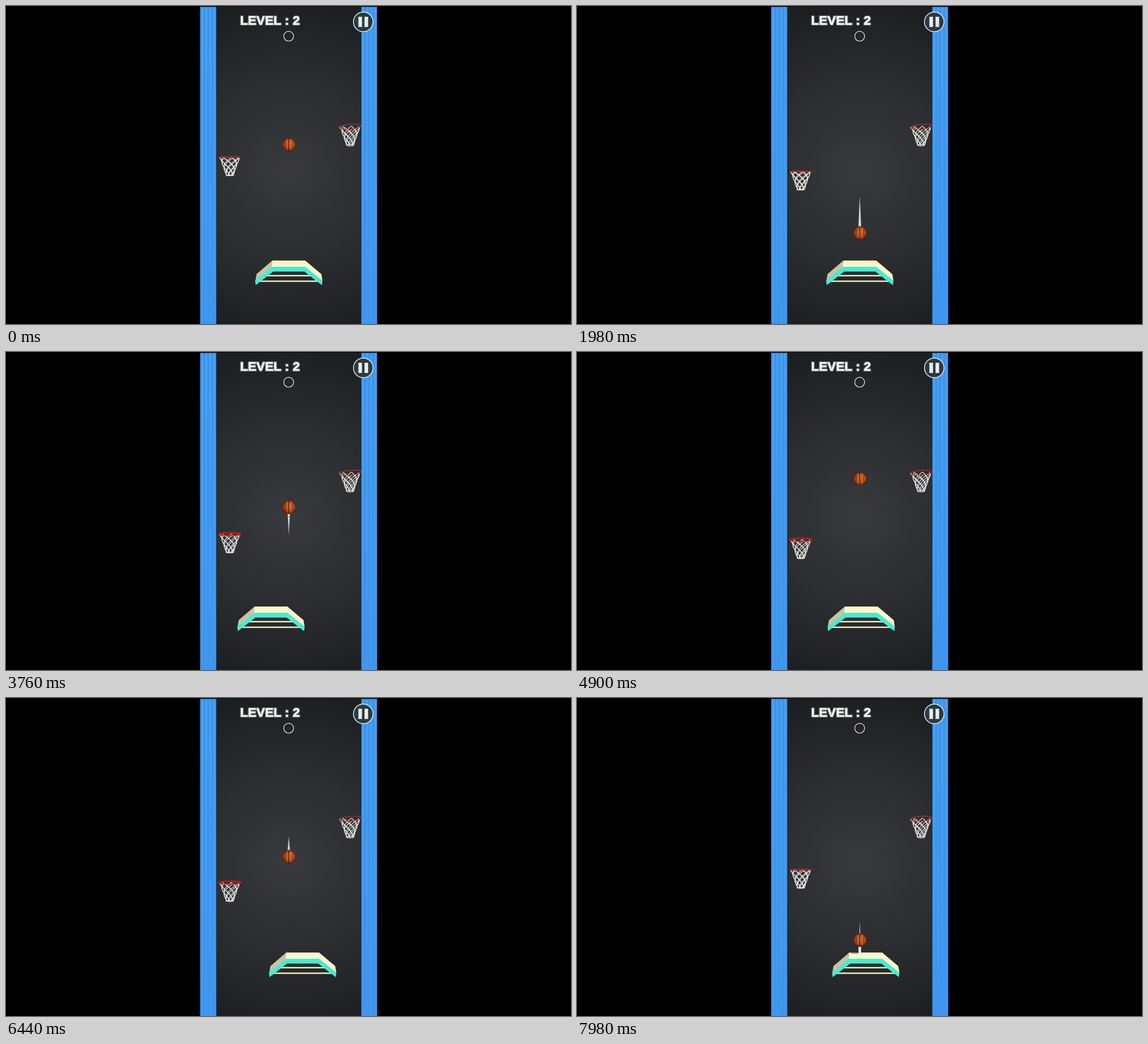
Animation of 998x561 px, one loop 8 s. Source, as an HTML page with a canvas:

```html
<!DOCTYPE html>
<html lang="en">
<head>
<meta charset="utf-8">
<title>Bouncing basketball</title>
<style>
html, body { margin: 0; width: 100%; height: 100%; overflow: hidden; background: #000; }
canvas { display: block; }
</style>
</head>
<body>
<canvas id="stage" width="998" height="561"></canvas>
<script>
const ctx = document.getElementById('stage').getContext('2d');
const LOOP = 8000;
const TRAIL = 530;
const BALL_X = 500;

// The playback advances in uneven beats: 20, 20, then a 100 ms hold.
function heldTime(t) {
  if (t < 120) return t < 20 ? 0 : 20;
  const beat = (start, from) => {
    const base = start + Math.floor((from - start) / 140) * 140;
    return base + Math.min(40, Math.floor((from - base) / 20) * 20);
  };
  if (t < 4880) return beat(120, t);
  if (t < 5040) return Math.min(4940, Math.floor(t / 20) * 20);
  return beat(5040, t);
}

// Successive flights, each one a parabola: [apex time, apex y].
const flights = [[-322, 241.5], [5060, 223], [10588, 223]];
const ballY = t => Math.min(...flights.map(([apex, y]) => y + 3e-5 * (t - apex) ** 2));
const hoopY = t => 298.5 + 33.5 * Math.cos(5.37e-4 * (t - 5290));

const paddleKeys = [[0, 499.5], [2680, 499.5], [3760, 468], [4900, 502], [6440, 524], [8000, 510]];
function paddleX(t) {
  const i = paddleKeys.findIndex(([time]) => time > t);
  const [t0, x0] = paddleKeys[i - 1], [t1, x1] = paddleKeys[i];
  const p = (t - t0) / (t1 - t0);
  return x0 + (x1 - x0) * p * p * (3 - 2 * p);
}

function polygon(color, points) {
  ctx.fillStyle = color;
  ctx.beginPath();
  points.forEach(([x, y]) => ctx.lineTo(x, y));
  ctx.fill();
}

function disc(x, y, r, fill, stroke, width) {
  ctx.beginPath();
  ctx.arc(x, y, r, 0, Math.PI * 2);
  if (fill) { ctx.fillStyle = fill; ctx.fill(); }
  if (stroke) { ctx.strokeStyle = stroke; ctx.lineWidth = width; ctx.stroke(); }
}

function pillar(x, width) {
  const g = ctx.createLinearGradient(x, 0, x + width, 0);
  for (let i = 0; i <= 8; i++) g.addColorStop(i / 8, i % 2 ? '#4ca5f4' : '#3b8fe6');
  ctx.fillStyle = g;
  ctx.fillRect(x, 1.5, width, 560);
  const shade = ctx.createLinearGradient(0, 0, 0, 561);
  shade.addColorStop(0, 'rgba(63,148,236,0)');
  shade.addColorStop(1, 'rgba(63,148,236,.75)');
  ctx.fillStyle = shade;
  ctx.fillRect(x, 1.5, width, 560);
}

function drawCourt() {
  ctx.fillStyle = '#000';
  ctx.fillRect(0, 0, 998, 561);
  const g = ctx.createRadialGradient(499, 290, 10, 499, 290, 300);
  g.addColorStop(0, '#38393c');
  g.addColorStop(.5, '#2c2d30');
  g.addColorStop(1, '#1c1f21');
  ctx.fillStyle = g;
  ctx.fillRect(371, 1, 257, 560);
  pillar(343, 28.5);
  pillar(627.5, 28);
  ctx.fillStyle = '#16293c';
  ctx.fillRect(371.5, 1, 1, 560);
  ctx.fillRect(626.5, 1, 1, 560);
}

function drawHud() {
  ctx.font = 'bold 22.6px "Liberation Sans", Arial, sans-serif';
  ctx.lineJoin = 'round';
  ctx.lineWidth = 2.6;
  ctx.strokeStyle = '#8a8b8c';
  ctx.strokeText('LEVEL : 2', 413.5, 33);
  ctx.fillStyle = '#fff';
  ctx.fillText('LEVEL : 2', 413.5, 33);
  disc(499.3, 53.3, 8.7, null, '#eee', 1.2);
  disc(631, 28, 17.3, '#293c42', '#e4e8e8', 1.5);
  ctx.fillStyle = '#eceeee';
  ctx.fillRect(622.5, 19, 6.3, 18);
  ctx.fillRect(633.3, 19, 6.3, 18);
}

function drawHoop(x, y, tilt) {
  const ry = Math.max(.5, Math.abs(y - 284) * .062);
  const fromAbove = y > 303;
  const rim = (start, end) => {
    ctx.strokeStyle = fromAbove ? '#d81c1c' : '#b3322b';
    ctx.lineWidth = fromAbove ? 1.8 : 1.3;
    ctx.beginPath();
    ctx.ellipse(x, y, 19.7, ry, tilt, start, end);
    ctx.stroke();
  };
  rim(Math.PI, Math.PI * 2);
  ctx.strokeStyle = '#e2e2de';
  ctx.lineWidth = 1.2;
  for (const dir of [-1, 1]) {
    for (let k = 0; k < 7; k++) {
      ctx.beginPath();
      for (let v = 0; v <= 1.001; v += .1) {
        const angle = k * Math.PI / 3.5 + .3 + dir * v * 2.5;
        const half = 18 - 11.7 * v ** .9;
        ctx.lineTo(x + half * Math.sin(angle), y + 1 + v * 31.5 + ry * .5 * (1 - v * .5) * Math.cos(angle));
      }
      ctx.stroke();
    }
  }
  ctx.beginPath();
  ctx.ellipse(x, y + 32.5, 6.3, Math.max(.5, ry * .3), 0, 0, Math.PI * 2);
  ctx.stroke();
  rim(0, Math.PI);
}

function drawPaddle(x, y) {
  ctx.save();
  ctx.translate(x, 0);
  ctx.fillStyle = '#f3edbd';
  ctx.fillRect(-40, 474.5, 80, 2.5);
  ctx.fillRect(-51, 484.3, 102, 2.5);
  polygon('#c9c3a0', [[-29, 449], [-57, 473], [-59, 485], [-29, 461]]);
  polygon('#fdf7c6', [[29, 449], [57.5, 473], [59.5, 485], [29, 461]]);
  polygon('#fff7c8', [[-29, 449], [29, 449], [30, 460.5], [-30, 460.5]]);
  polygon('#45ebd3', [[-29, 460], [29, 460], [59.5, 484.5], [58.5, 492.5],
    [27.5, 468.5], [-27.5, 468.5], [-58.5, 492.5], [-59.5, 484.5]]);
  ctx.restore();
  if (y > 405) {
    ctx.fillStyle = 'rgba(90,88,75,.6)';
    ctx.beginPath();
    ctx.ellipse(491, 450, 8, 1.3, 0, 0, Math.PI * 2);
    ctx.fill();
  }
}

function drawTrail(t) {
  const steps = 40;
  ctx.strokeStyle = '#e8e8ec';
  for (let i = steps; i > 0; i--) {
    ctx.lineWidth = 5.6 * (1 - (i - .5) / steps);
    ctx.beginPath();
    ctx.moveTo(499.5, ballY(t - TRAIL * i / steps));
    ctx.lineTo(499.5, ballY(t - TRAIL * (i - 1) / steps));
    ctx.stroke();
  }
}

function drawBall(y) {
  ctx.save();
  ctx.translate(BALL_X, y);
  const g = ctx.createRadialGradient(2, -3, 1, 0, 0, 12);
  g.addColorStop(0, '#d9662f');
  g.addColorStop(.65, '#b95022');
  g.addColorStop(1, '#4a1f10');
  disc(0, 0, 12, g);
  ctx.strokeStyle = '#2a120a';
  ctx.lineWidth = 1;
  ctx.beginPath();
  ctx.moveTo(-.5, -12);
  ctx.lineTo(-.5, 12);
  ctx.stroke();
  ctx.strokeStyle = 'rgba(42,18,10,.75)';
  ctx.lineWidth = .8;
  ctx.beginPath();
  for (const side of [-1, 1]) {
    ctx.moveTo(side * 8, -8.5);
    ctx.quadraticCurveTo(side * 4.5, 0, side * 8, 8.5);
  }
  ctx.stroke();
  ctx.restore();
}

function render(now) {
  const t = heldTime(now % LOOP);
  const y = ballY(t);
  drawCourt();
  drawHud();
  drawHoop(395.3, hoopY(t), 0);
  drawHoop(607.7, 213, -.08);
  drawPaddle(paddleX(t), y);
  drawTrail(t);
  drawBall(y);
}

const start = performance.now();
function tick() {
  render(performance.now() - start);
  requestAnimationFrame(tick);
}
tick();
</script>
</body>
</html>
```
